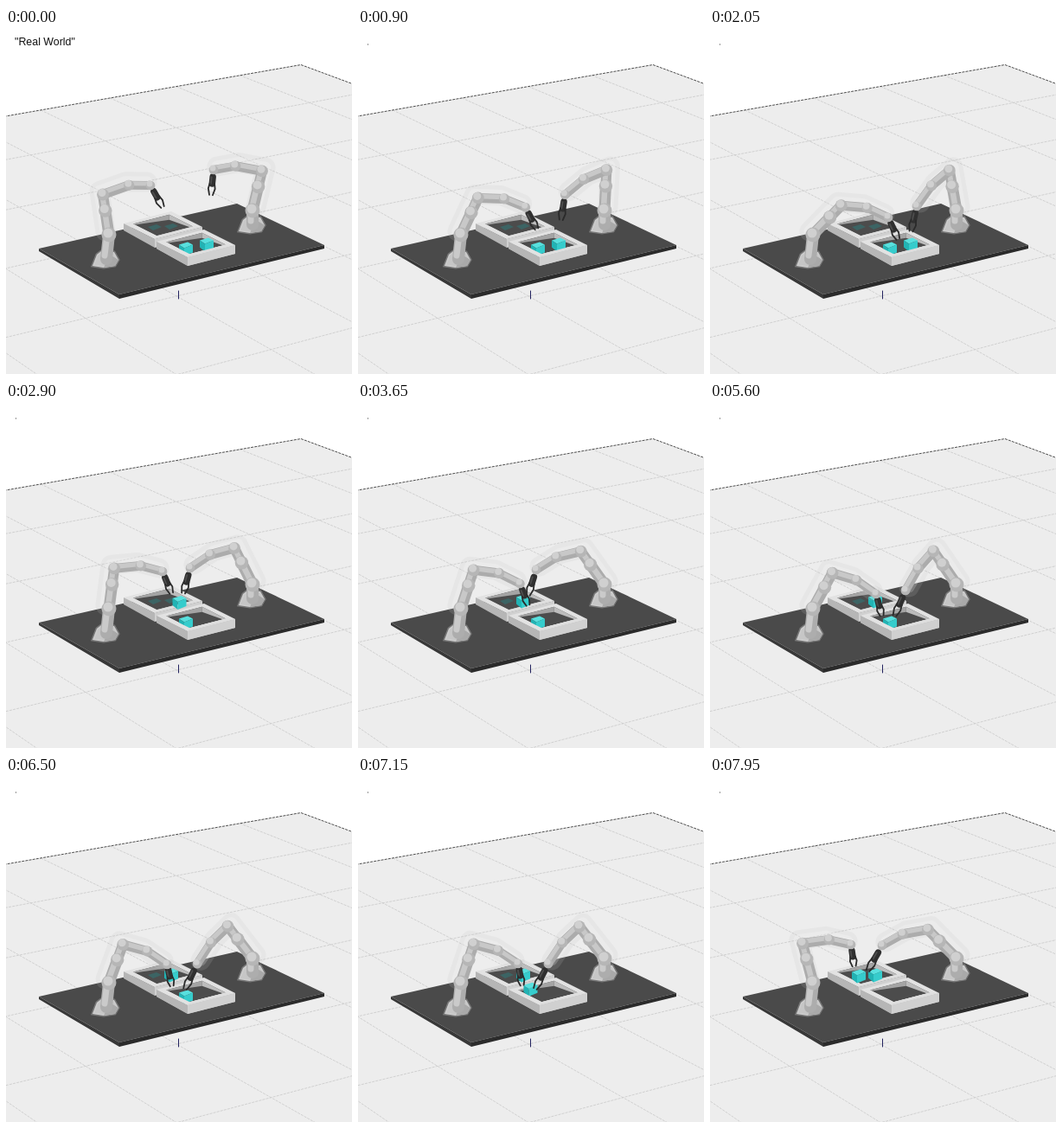
An HTML page for the animation above (8000 ms loop, 400x400 px).

```html
<!DOCTYPE html>
<html lang="en">
<head>
<meta charset="utf-8">
<title>Two arms</title>
<style>
html, body { margin: 0; width: 100%; height: 100%; overflow: hidden; background: #fff; }
svg { display: block; width: 100vw; height: 100vh; }
text { font: 12.4px "Liberation Sans", Arial, sans-serif; fill: #111; }
</style>
</head>
<body>
<svg id="stage" viewBox="0 0 400 400">
  <g id="scene"></g>
  <g id="cubes"></g>
  <g id="rim"></g>
  <g id="arms"></g>
  <text id="label" x="10" y="19.5">"Real World"</text>
  <rect id="dot" x="11" y="18.5" width="1" height="1" fill="#333"/>
</svg>
<script>
const LOOP = 8000, STEP = 50, LABEL_END = 450;
const el = id => document.getElementById(id);
const mix = (a, b, k) => a + (b - a) * k;
const at = (p, q, k) => [mix(p[0], q[0], k), mix(p[1], q[1], k)];
const add = (p, x, y) => [p[0] + x, p[1] + y];
const poly = (pts, fill, extra = '') => `<polygon points="${pts.join(' ')}" fill="${fill}" ${extra}/>`;
const line = (pts, color, w, extra = '') =>
  `<polyline points="${pts.join(' ')}" fill="none" stroke="${color}" stroke-width="${w}" ` +
  `stroke-linecap="round" stroke-linejoin="round" ${extra}/>`;
const disc = (p, r, fill) => `<circle cx="${p[0]}" cy="${p[1]}" r="${r}" fill="${fill}"/>`;
const dashed = (pts, color) =>
  `<polyline points="${pts.join(' ')}" fill="none" stroke="${color}" stroke-width=".9" stroke-dasharray="3 1.2"/>`;

// Perspective floor: u runs left along the back edge, v runs toward the viewer.
function ground(u, v) {
  const w = 1 - 0.02 * u - 0.0438 * v;
  return [(341 - 76 * u + 63.5 * v) / w, (42.5 + 11.2 * u + 27.2 * v) / w];
}

function floor() {
  let s = poly([ground(0, 0), ground(16, 0), [-900, 900], [900, 900], ground(0, 9)], '#ededed');
  for (let v = 1; v < 9; v++) s += dashed([ground(0, v), ground(16, v)], '#cdcdcd');
  for (let u = 1; u < 16; u++) s += dashed([ground(u, 0), ground(u, 9)], '#cdcdcd');
  return s + dashed([ground(6, 0), ground(0, 0), ground(0, 2)], '#3c3c3c') +
    line([[199.5, 304], [199.5, 313]], '#23235f', 1);
}

function table() {
  const l = [38, 255], b = [267, 203], r = [368, 251], f = [131, 308];
  return poly([l, b, r, f], '#4a4a4a') +
    poly([l, f, add(f, 0, 5), add(l, 0, 3)], '#383838') +
    poly([f, r, add(r, 0, 4), add(f, 0, 5)], '#2b2b2b');
}

// An open box given by its left corner; s runs to the back, t to the front.
const binAt = (x, y) => (s, t) => [x + 55 * s + 36 * t, y - 14 * s + 18 * t];
const backBin = binAt(136, 226), frontBin = binAt(174, 247);
const IN = 0.12, OUT = 0.88;

function binFront(p) {
  const l = p(0, 0), f = p(0, 1), r = p(1, 1), hf = p(IN, OUT);
  return poly([l, p(IN, IN), hf, f], '#e2e2e2') + poly([f, hf, p(OUT, OUT), r], '#dedede') +
    poly([l, f, add(f, 0, 10), add(l, 0, 8)], '#b6b6b6') +
    poly([f, r, add(r, 0, 10), add(f, 0, 10)], '#d0d0d0');
}

function bin(p) {
  const hl = p(IN, IN), hb = p(OUT, IN), hr = p(OUT, OUT);
  return poly([p(0, 0), p(1, 0), p(1, 1), p(0, 1)], '#e2e2e2') +
    poly([hl, hb, hr, p(IN, OUT)], '#4c4c4c') +
    poly([hl, hb, add(hb, 0, 6), add(hl, 2, 1)], '#a4a4a4') +
    poly([hb, hr, add(hr, -3, 1), add(hb, 0, 6)], '#bcbcbc') + binFront(p);
}

const tile = ([x, y]) => [[x - 8, y - 1], [x + 2, y - 4], [x + 8, y - 1], [x - 2, y + 3]];
const goal = p => poly(tile(p), '#3c6464');

function cube(p) {
  const [l, b, r, f] = tile(add(p, 0, -3.5));
  return poly([l, b, r, f], '#58e0de') +
    poly([l, f, add(f, 0, 9), add(l, 0, 8)], '#22b3b4') +
    poly([f, r, add(r, 0, 9), add(f, 0, 9)], '#36cccc');
}

// Carries a cube from a to b with a small lift on the way.
function carried(a, b, t0, t1, t) {
  const x = Math.min(1, Math.max(0, (t - t0) / (t1 - t0))), k = x * x * (3 - 2 * x);
  return add(at(a, b, k), 0, -7 * Math.sin(k * Math.PI) ** 2);
}

// Wrist stops: time, left x y, right x y.
const stops = [
  [0, 167, 182, 240, 164],
  [2050, 206, 219, 239, 206],
  [2900, 181, 196, 213, 192],
  [4550, 190, 216, 203, 195],
  [5600, 192, 222, 226, 218],
  [7150, 185, 217, 220, 217],
  [7950, 163, 195, 199, 196]
];

function wrists(t) {
  const i = Math.max(1, stops.findIndex(s => s[0] >= t));
  const a = stops[i - 1], b = stops[i], k = 1 - (1 - (t - a[0]) / (b[0] - a[0])) ** 2;
  const [, lx, ly, rx, ry] = a.map((v, j) => mix(v, b[j], k));
  return { left: [lx, ly], right: [rx, ry] };
}

// Elbow of a two-bone chain, bent to the upper side.
function elbowOf(p, q, upper, fore, side) {
  const dx = q[0] - p[0], dy = q[1] - p[1], d = Math.hypot(dx, dy);
  const c = (d * d + upper * upper - fore * fore) / (2 * d * upper);
  const a = Math.atan2(dy, dx) - side * Math.acos(Math.max(-1, Math.min(1, c)));
  return add(p, upper * Math.cos(a), upper * Math.sin(a));
}

function gripper(wrist, tip) {
  const dx = tip[0] - wrist[0], dy = tip[1] - wrist[1], d = Math.hypot(dx, dy);
  const out = (k, s) => add(at(wrist, tip, k), -dy / d * s, dx / d * s);
  const finger = s => line([out(0.55, s), out(0.75, s * 1.4), out(1, s * 0.7)], '#2a2a2a', 1.8);
  return line([out(0.28, 0), out(0.55, 0)], '#303030', 7.5) +
    line([out(0.3, 1.5), out(0.55, 1.5)], '#4c4c4c', 2) + finger(2.8) + finger(-2.8);
}

function arm(base, shoulder, wrist, reach, side) {
  const elbow = elbowOf(shoulder, wrist, 47, 56, side);
  const chain = [shoulder, at(shoulder, elbow, 0.6), elbow, add(at(elbow, wrist, 0.55), 0, -5), wrist];
  const ghost = chain.map(p => add(p, -side * 4, -4));
  const foot = [[-16, 8], [-11, -5], [-6, -9], [9, -8], [14, 1], [10, 8], [-3, 10]].map(([x, y]) => add(base, x, y));
  let s = line(ghost, '#bdbdbd', 23, 'opacity=".16"') + line(ghost, '#fff', 13, 'opacity=".2"');
  s += poly(foot, '#c6c6c6', 'stroke="#ddd" stroke-opacity=".3" stroke-width="3"');
  s += poly([foot[4], foot[5], foot[6], add(base, 4, -5)], '#a9a9a9');
  s += line([base, shoulder], '#adadad', 14) + line([add(base, -2, -4), add(shoulder, -2, 0)], '#cacaca', 7);
  s += gripper(wrist, add(wrist, ...reach));
  chain.forEach((p, i) => {
    const next = chain[i + 1], w = 13 - i;
    if (next) s += line([p, next], '#acacac', w) + line([add(p, -1, -2), add(next, -1, -2)], '#c8c8c8', w / 2);
    s += disc(p, 8.5 - i * 0.8, '#b6b6b6') + disc(add(p, -1, -2), 5.5 - i * 0.5, '#d0d0d0');
  });
  return s;
}

const nearGoal = [172, 231], farGoal = [191, 230];

function draw(t) {
  const { left, right } = wrists(t), sec = t / 1000;
  el('cubes').innerHTML = cube(carried([232, 250], farGoal, 2350, 3150, t)) +
    cube(carried([208, 255], nearGoal, 6850, 7800, t));
  el('arms').innerHTML = arm([285, 227], [285, 211], right, [-3 - 1.7 * sec, 29], -1) +
    arm([116, 267], [119, 239], left, [14 - 1.3 * sec, 25], 1);
  el('label').style.display = t < LABEL_END ? '' : 'none';
  el('dot').style.display = t < LABEL_END ? 'none' : '';
}

el('scene').innerHTML = floor() + table() + bin(backBin) + goal(nearGoal) + goal(farGoal) + bin(frontBin);
el('rim').innerHTML = binFront(frontBin);

const start = performance.now();
function tick(now) {
  const t = Math.max(0, now - start) % LOOP;
  draw(Math.min(7950, Math.floor(t / STEP) * STEP));
  requestAnimationFrame(tick);
}
draw(0);
requestAnimationFrame(tick);
</script>
</body>
</html>
```
